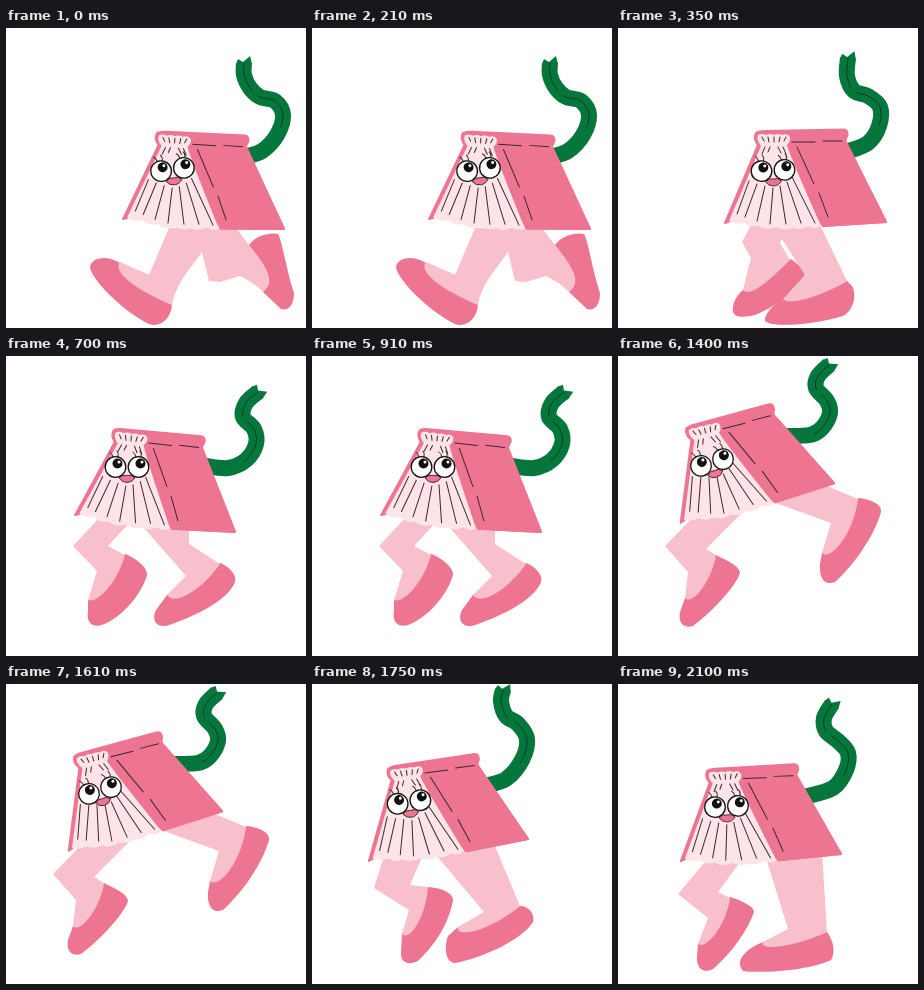
Write an HTML page that moves like this. It is 300 px wide and 300 px high and loops after 2450 ms.

```html
<!DOCTYPE html>
<html lang="en">
<head>
<meta charset="utf-8">
<title>Walking book</title>
<style>
  html, body { margin: 0; width: 100%; height: 100%; overflow: hidden; background: #fff; }
  svg { display: block; width: 100%; height: 100%; }
  .pose { visibility: hidden; }
  .leg { fill: #f8c0cc; }
  .shoe, .cover { fill: #ee7592; }
  .cover { stroke: #ee7592; stroke-width: 2; stroke-linejoin: round; }
  .pages { fill: #fce4e8; }
  .ink { fill: none; stroke: #3a272d; stroke-width: 1; stroke-linecap: round; }
  .tail { fill: none; stroke: #05763c; stroke-width: 16; }
  .tip { fill: #05763c; }
  .vein { fill: none; stroke: #063d22; stroke-width: 1; stroke-dasharray: 30 7 48 200; }
  .eye { fill: #fff; stroke: #111; stroke-width: 1.3; }
  .lip { fill: #ee7592; stroke: #2b1a20; stroke-width: .8; }
</style>
</head>
<body>
<svg id="stage" viewBox="0 0 300 300">
  <defs>
    <g id="book">
      <path class="cover" d="M138 105Q141 103 147 103L226 101.5Q230 102 229.5 107L227 113L268 194L205 198L172 150L112 193L107 195L140 117Q135 111 138 105Z"/>
      <path class="pages" d="M140 107Q144 105 148 107Q152 105 156 107Q160 105 164 107Q170 105 172 109Q173 113 169 117
        Q172 128 203 198Q197 202 190 198Q183 203 175 200Q166 203 158 199Q149 203 141 198Q133 200 126 195Q119 197 111 193
        L143 118Q138 112 140 107Z"/>
      <path class="cover" d="M174 113L227 112L268 194L205 198L171 118Z"/>
      <path class="ink" d="M174 114H197M205 113H224M179 119L196 156M201 165L210 189
        M144 109L146 113M150 109L151 114M156 109V114M162 109L161 114M168 109L166 113
        M147 119L144 126M152 119L150 124M160 119L163 125M165 119L168 126
        M131 153L119 186M139 156L127 189M147 158L139 193M155 160L152 196
        M162 158L168 196M169 154L183 195M174 149L197 195"/>
    </g>
    <g id="face">
      <g id="eye">
        <path class="ink" d="M-14-10Q-15-14-17-15M-9-10Q-8-14-10-16"/>
        <circle class="eye" cx="-11.5" r="10.3"/>
        <circle cx="-9.5" cy="-3.5" r="5" fill="#111"/>
        <circle cx="-8" cy="-5" r="1.5" fill="#fff"/>
      </g>
      <use href="#eye" x="23"/>
      <path class="lip" d="M-8 11Q-4 7 0 8.5Q4 7 8 11Q5 15.5 0 15.5Q-5 15.5-8 11Z"/>
    </g>
  </defs>
</svg>
<script>
const STEP = 350;
const stage = document.getElementById('stage');
const poses = [];

function add(parent, name, attrs) {
  const node = document.createElementNS('http://www.w3.org/2000/svg', name);
  for (const key in attrs) node.setAttribute(key, attrs[key]);
  return parent.appendChild(node);
}

const parsePoints = text => text.split(' ').map(pair => pair.split(',').map(Number));

// Catmull-Rom spline as cubic segments
function smooth(points) {
  const at = i => points[Math.max(0, Math.min(points.length - 1, i))];
  let d = 'M' + points[0];
  for (let i = 0; i < points.length - 1; i++) {
    const [a, b, c, e] = [at(i - 1), at(i), at(i + 1), at(i + 2)];
    const c1 = b.map((v, k) => v + (c[k] - a[k]) / 6);
    const c2 = c.map((v, k) => v - (e[k] - b[k]) / 6);
    d += `C${c1} ${c2} ${c}`;
  }
  return d;
}

// Affine matrix taking the resting book's three corners to the given ones
function bookMatrix([topLeft, bottomRight, bottomLeft]) {
  const ux = 132, uy = 90, vx = -31, vy = 92, det = ux * vy - uy * vx;
  const rows = [0, 1].map(k => {
    const u = bottomRight[k] - topLeft[k], v = bottomLeft[k] - topLeft[k];
    const mx = (u * vy - v * uy) / det, my = (v * ux - u * vx) / det;
    return [mx, my, topLeft[k] - mx * 137 - my * 104];
  });
  return `matrix(${[0, 1, 2].map(i => rows[0][i] + ' ' + rows[1][i]).join(' ')})`;
}

function addTail(group, points) {
  const [p, q] = points;
  const len = Math.hypot(p[0] - q[0], p[1] - q[1]);
  const ox = (p[0] - q[0]) / len, oy = (p[1] - q[1]) / len;
  const from = (side, out) => [p[0] - oy * side + ox * out, p[1] + ox * side + oy * out];
  const d = smooth(points);
  add(group, 'path', { class: 'tail', d });
  add(group, 'polygon', { class: 'tip', points: [from(-8, -1), from(-6, 4), from(-1, 1), from(6, 7), from(8, -1)].join(' ') });
  add(group, 'path', { class: 'vein', d });
}

// limbs alternate shoe, leg; each leg's instep overlaps its shoe
function pose({ book, face, tail, limbs }) {
  const group = add(stage, 'g', { class: 'pose' });
  addTail(group, parsePoints(tail));
  limbs.forEach((d, i) => add(group, 'path', { class: i % 2 ? 'leg' : 'shoe', d }));
  add(group, 'use', { href: '#book', transform: bookMatrix(parsePoints(book)) });
  const [x, y, turn] = face;
  add(group, 'use', { href: '#face', transform: `translate(${x} ${y}) rotate(${turn})` });
  poses.push(group);
}

pose({
  book: '150,104 279,201 116,192', face: [166.5, 141.5, -8],
  tail: '238,35 238,47 244,60 254,69 269,73 277,87 271,107 256,123 238,129',
  limbs: [
    'M114 235C100 226 84 230 84 240C88 255 120 285 143 296C155 300 165 290 166 277L150 250Z',
    'M163 200L143 247L114 234C106 244 130 262 166 277C170 255 185 240 196 224L202 200Z',
    'M243 217C250 207 265 204 272 206C276 212 280 240 288 265C288 278 282 283 275 281L257 264Z',
    'M185 200L196 224L203 253L214 254L234 248Q250 256 257 264C270 255 262 240 243 217L230 200Z'
  ]
});
pose({
  book: '137,104 269,194 106,196', face: [155, 142.5, -3],
  tail: '230,30 229,48 236,63 250,68 262,79 261,98 250,115 228,124',
  limbs: [
    'M125 262C118 268 114 276 115 284C117 290 128 290 140 286C160 276 185 262 187 248C186 240 178 235 173 231Z',
    'M133 197L124 214L133 230L125 262C132 270 152 252 172 232L162 215L172 197Z',
    'M165 272C152 278 146 288 147 293C155 300 195 297 225 288C236 282 239 266 234 258L228 252Z',
    'M155 197L187 247L165 271C170 278 205 268 229 253L202 197Z'
  ]
});
pose({
  book: '107,73 230,176 68,160', face: [121, 111, 0],
  tail: '252,36 240,47 237,61 248,73 250,88 240,104 222,112 200,110',
  limbs: [
    'M119 198C130 202 142 212 141 219C135 240 115 262 96 269C86 272 80 266 82 255V244Z',
    'M95 160L67 190L91 215L82 244C92 248 112 225 119 199L102 190L125 165Z',
    'M214 207C222 210 231 218 229 226C222 245 185 262 160 270C148 271 146 262 150 254L161 239Z',
    'M132 165L180 220L161 239C168 250 195 235 214 208L183 188V165Z'
  ]
});
pose({
  book: '137,13 212,154 70,80', face: [136.5, 53.5, 29],
  tail: '295,55 284,57 274,60 265,72 263,85 254,99 239,102 222,98 208,90',
  limbs: [
    'M26 131C13 136 5 148 6 154C10 161 60 159 83 156C84 150 84 130 79 123Z',
    'M76 78C55 78 44 82 44 95L42 118L25 131C22 141 50 140 78 124L76 108L106 107L100 85Z',
    'M140 184C128 188 119 200 120 210C125 217 175 214 209 204C213 195 210 178 203 172Z',
    'M142 118L165 171L139 183C136 194 170 190 203 173L190 140L150 112Z'
  ]
});
pose({
  book: '67,72 217,127 62,168', face: [94, 106.5, -17],
  tail: '211,9 200,20 198,32 209,45 212,57 204,72 192,79 168,80',
  limbs: [
    'M98 199C108 204 122 210 122 217C118 230 95 255 75 270C65 273 60 266 62 256L67 242Z',
    'M78 158L47 190L70 216L67 242C74 250 94 225 98 199L88 193L125 156Z',
    'M240 142C252 143 264 148 263 156C258 175 240 205 217 226C206 230 201 222 202 208L204 197Z',
    'M155 146L213 167L204 197C212 205 235 180 240 143L190 122L150 140Z'
  ]
});
pose({
  book: '75,84 217,155 56,178', face: [97, 118, -9],
  tail: '191,6 189,17 194,32 206,40 215,55 210,76 194,95 172,102',
  limbs: [
    'M116 203C128 204 141 208 141 216C137 240 122 262 106 277C96 282 88 278 89 268L90 250Z',
    'M72 172L62 204L97 226L90 250C98 258 114 232 116 203L98 201L112 168Z',
    'M208 222C217 222 223 230 221 238C210 256 170 274 143 279C133 279 132 262 136 252L146 243Z',
    'M125 172L172 228L146 243C143 254 175 249 208 222L180 155Z'
  ]
});
pose({
  book: '88,86 224,170 62,178', face: [108.5, 122.5, -3],
  tail: '214,20 206,34 208,47 220,57 230,69 228,86 215,104 186,113',
  limbs: [
    'M112 213C122 216 136 222 136 228C130 245 115 268 95 285C85 290 78 284 79 272L80 260Z',
    'M92 172L60 210L90 234L80 260C88 266 108 242 112 214L100 208L125 174Z',
    'M209 248C215 256 218 268 213 276C195 285 150 290 125 287C117 278 125 266 145 258Z',
    'M148 174L170 245L145 258C140 268 180 262 209 248L204 168Z'
  ]
});

function draw() {
  const current = Math.floor(performance.now() / STEP) % poses.length;
  poses.forEach((group, i) => { group.style.visibility = i === current ? 'visible' : 'hidden'; });
  requestAnimationFrame(draw);
}
draw();
</script>
</body>
</html>
```
